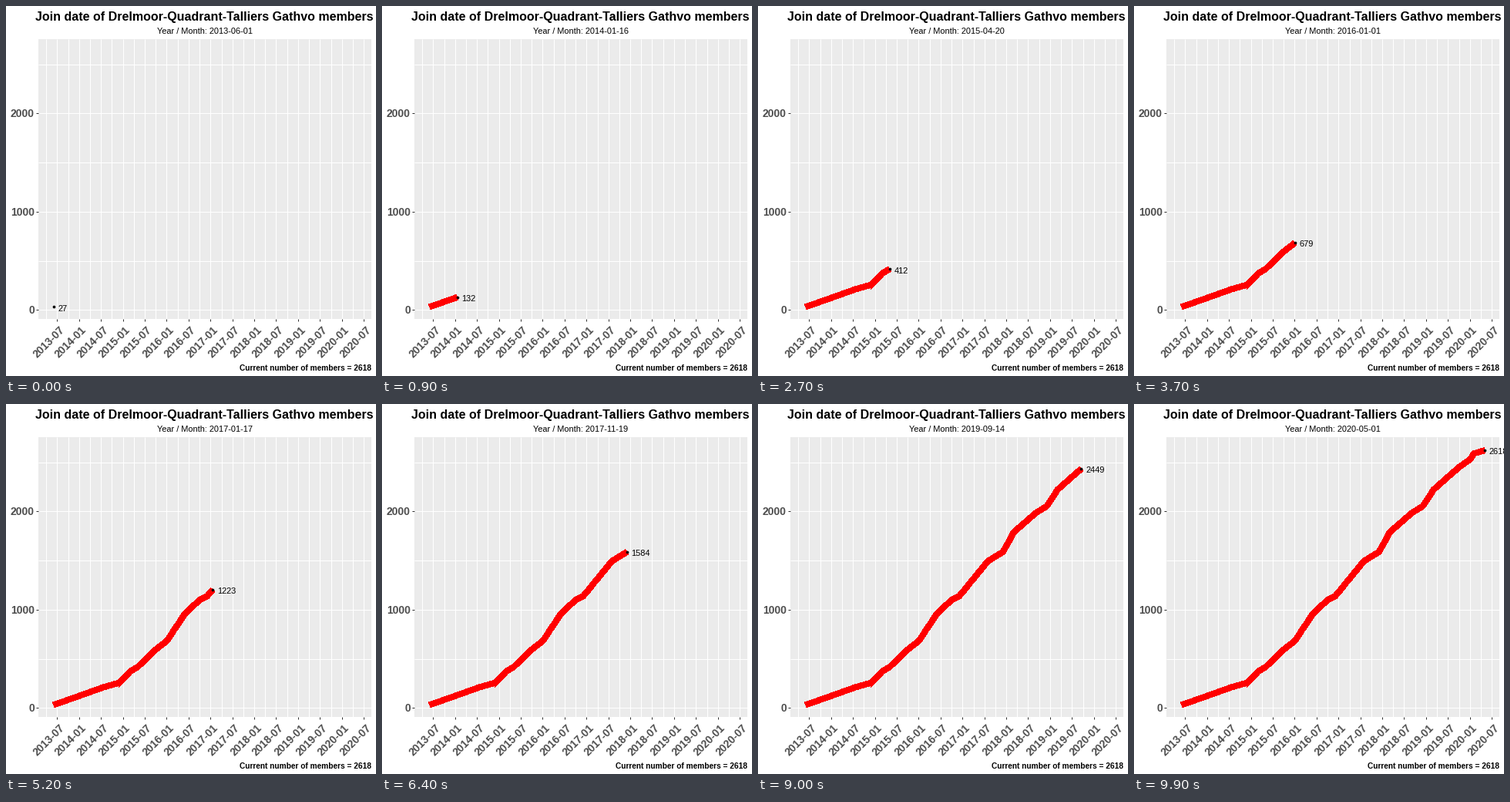
Recreate the animation shown at these times as a matplotlib script. Size 480 by 480 pixels, loop 10000 ms.

```python
import numpy as np
import matplotlib.pyplot as plt
from matplotlib.animation import FuncAnimation
from matplotlib.patches import Rectangle

plt.rcParams["font.family"] = "Liberation Sans"

SIZE, DPI, FRAMES = 480, 72, 100
LEFT, RIGHT, TOP, BOTTOM = 42, 474, 43, 406
START = np.datetime64("2013-06-01")

# Turning points of the growth curve: (months since start, members)
TURNS = [(0, 27), (14, 211), (18, 252), (21, 369), (23, 412), (28, 592),
         (31, 679), (36, 958), (40, 1098), (42, 1134), (44, 1223),
         (50, 1494), (54, 1584), (57, 1785), (63, 1981), (66, 2050),
         (69, 2218), (76, 2449), (79, 2528), (80, 2587), (83, 2618)]


def day_of(months):
    return (months.astype("datetime64[D]") - START).astype(int)


MONTHS = np.arange("2013-06", "2020-06", dtype="datetime64[M]")
DAYS = day_of(MONTHS)
SPAN = int(DAYS[-1])
TOTALS = np.round(np.interp(np.arange(len(MONTHS)), *zip(*TURNS))).astype(int)
# Each month snaps to its nearest animation step
STEPS = np.round(DAYS * (FRAMES - 1) / SPAN).astype(int)


def px(day):
    return 61.8 + 0.15565 * day


def py(value):
    return 393.8 - 0.1274 * value


def crisp(v):
    return np.floor(v) + 0.5


fig = plt.figure(figsize=(SIZE / DPI, SIZE / DPI), dpi=DPI, facecolor="white")
ax = fig.add_axes([0, 0, 1, 1])
ax.set_xlim(0, SIZE)
ax.set_ylim(SIZE, 0)
ax.axis("off")


def rule(x, y, color):
    ax.plot(x, y, color=color, lw=1, solid_capstyle="butt", zorder=1)


def write(x, y, text, size, color="black", **kw):
    return ax.text(x, y, text, fontsize=size, color=color, **kw)


def draw_axes():
    ax.add_patch(Rectangle((LEFT, TOP), RIGHT - LEFT, BOTTOM - TOP,
                           fc="#EBEBEB", ec="none", zorder=0))
    ticks = np.arange("2013-07", "2020-08", 6, dtype="datetime64[M]")
    xs = px(day_of(ticks)) - 0.78
    mids = np.append(1.5 * xs[0] - 0.5 * xs[1], (xs[1:] + xs[:-1]) / 2)
    for x in crisp(np.append(xs, mids)):
        rule([x, x], [TOP, BOTTOM], "white")
    for value in range(0, 2501, 500):
        y = crisp(py(value))
        rule([LEFT, RIGHT], [y, y], "white")
        if value % 1000 == 0:
            rule([LEFT - 3, LEFT], [y, y], "#333333")
            write(37, y + 5.5, str(value), 14, "#4D4D4D",
                  weight="bold", ha="right")
    for x, month in zip(xs, ticks):
        rule([crisp(x)] * 2, [BOTTOM, BOTTOM + 3], "#333333")
        write(x - 10.2, 436, str(month), 14, "#4D4D4D", weight="bold",
              rotation=45, ha="center", va="center")


draw_axes()
write(257.5, 19, "Join date of Drelmoor-Quadrant-Talliers Gathvo members", 16,
      weight="bold", ha="center")
write(474, 473, f"Current number of members = {TOTALS[-1]}", 10.15,
      weight="bold", ha="right")
subtitle = write(258, 36, "", 11, ha="center")
line, = ax.plot([], [], color="red", lw=7, antialiased=False, zorder=3,
                solid_capstyle="butt", solid_joinstyle="round")
dot, = ax.plot([], [], "o", color="black", ms=3.7, mew=0, zorder=4)
count = write(0, 0, "", 11, zorder=5)


def update(i):
    day = np.interp(i, STEPS, DAYS)
    total = np.interp(i, STEPS, TOTALS)
    x, y = px(day), py(total)
    past = STEPS < i
    line.set_data(np.append(px(DAYS[past]), x), np.append(py(TOTALS[past]), y))
    dot.set_data([x], [y])
    count.set_position((x + 5.8, y + 5.2))
    count.set_text(str(TOTALS[np.searchsorted(STEPS, i)]))
    subtitle.set_text(f"Year / Month: {START + i * SPAN // (FRAMES - 1)}")
    return line, dot, count, subtitle


anim = FuncAnimation(fig, update, frames=FRAMES, interval=100,
                     repeat=True, repeat_delay=0, blit=False)
plt.show()
```
